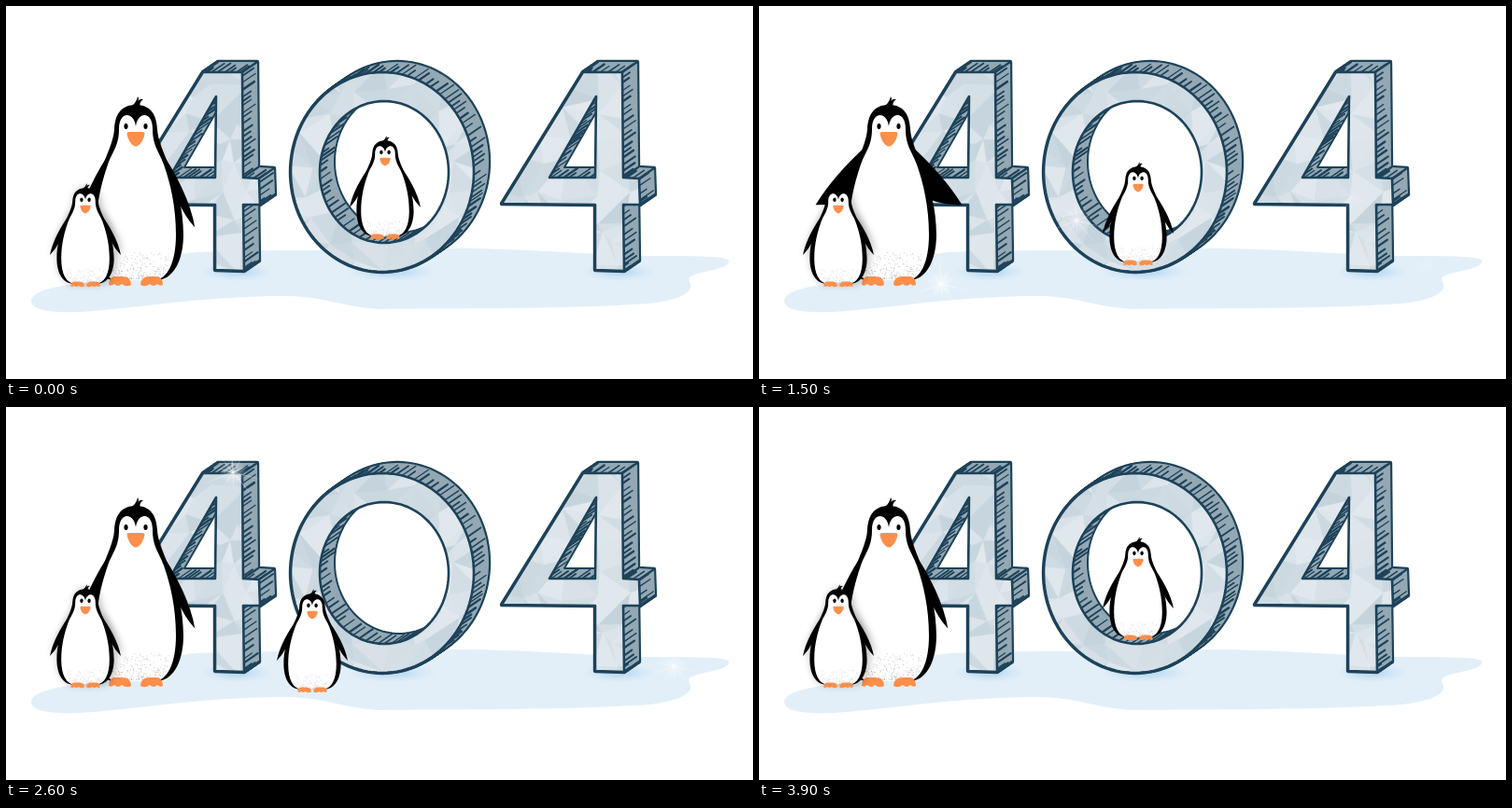
Animation, 800 px wide and 400 px high, one loop 4000 ms. Source, as an HTML page with a canvas:

```html
<!DOCTYPE html>
<html lang="en">
<head>
<meta charset="utf-8">
<title>404</title>
<style>
html, body { margin: 0; width: 100%; height: 100%; overflow: hidden; background: #fff; }
canvas { display: block; width: 800px; height: 400px; }
</style>
</head>
<body>
<canvas id="stage" width="800" height="400"></canvas>
<script>
const LOOP = 4000, STEP = 100;
const INK = '#1d4259', SIDE = '#93a8b3', ORANGE = '#fb8f4b';
const DX = 16, DY = -11;
const ctx = document.getElementById('stage').getContext('2d');

const lerp = (a, b, u) => a + (b - a) * u;
const clamp = u => Math.min(1, Math.max(0, u));
const smooth = u => u * u * (3 - 2 * u);
const bump = u => 4 * u * (1 - u);
function seeded(s) {
  return () => (s = (s * 16807) % 2147483647) / 2147483647;
}

const shape = pts => new Path2D('M' + pts.join('L') + 'Z');
const ring = (x, y, rx, ry) => Array.from({ length: 120 }, (_, i) => {
  const a = i * Math.PI / 60;
  return [x + rx * Math.cos(a), y + ry * Math.sin(a)];
});

// Low-poly ice over a box, inside the current clip
function facets(g, x, y, w, h, rnd) {
  const cell = 27, cols = Math.ceil(w / cell), rows = Math.ceil(h / cell);
  const grid = Array.from({ length: rows + 1 }, (_, r) => Array.from({ length: cols + 1 }, (_, c) =>
    [x + (c + rnd() * .8 - .4) * cell, y + (r + rnd() * .8 - .4) * cell]));
  const tri = (...pts) => {
    const v = rnd(), p = shape(pts);
    g.fillStyle = g.strokeStyle = `rgb(${lerp(196, 226, v)},${lerp(211, 233, v)},${lerp(220, 238, v)})`;
    g.fill(p);
    g.stroke(p);
  };
  g.lineWidth = .5;
  for (let r = 0; r < rows; r++) for (let c = 0; c < cols; c++) {
    const a = grid[r][c], b = grid[r][c + 1], d = grid[r + 1][c], e = grid[r + 1][c + 1];
    if (rnd() < .5) { tri(a, b, d); tri(b, d, e); }
    else { tri(a, b, e); tri(a, d, e); }
  }
}

// Pen strokes in the depth direction all along an outline
function hatch(g, pts, rnd) {
  const gap = 6.5;
  let rest = gap / 2;
  pts.forEach(([x, y], i) => {
    const [x2, y2] = pts[(i + 1) % pts.length], len = Math.hypot(x2 - x, y2 - y);
    for (; rest < len; rest += gap * (.65 + rnd() * .7)) {
      const u = rest / len, k = .4 + rnd() * .55;
      g.lineWidth = 1.2 + rnd() * 1.3;
      g.beginPath();
      g.moveTo(lerp(x, x2, u), lerp(y, y2, u));
      g.lineTo(lerp(x, x2, u) + DX * k, lerp(y, y2, u) + DY * k);
      g.stroke();
    }
    rest -= len;
  });
}

// A digit: swept side, icy front, hole with its inner side
function block(g, outer, inner, seed) {
  const rnd = seeded(seed), face = shape(outer), hole = shape(inner);
  const shifted = (path, k, draw) => {
    g.save();
    g.translate(DX * k, DY * k);
    draw(path);
    g.restore();
  };
  g.strokeStyle = INK;
  g.fillStyle = SIDE;
  g.lineWidth = 4.4;
  for (let k = 0; k <= 1; k += 1 / 16) shifted(face, k, p => g.stroke(p));
  for (let k = 0; k <= 1; k += 1 / 16) shifted(face, k, p => g.fill(p));
  hatch(g, outer, rnd);
  g.lineWidth = 2.2;
  if (outer.length < 20) for (const [x, y] of outer) {
    g.beginPath();
    g.moveTo(x, y);
    g.lineTo(x + DX, y + DY);
    g.stroke();
  }

  const xs = outer.map(p => p[0]), ys = outer.map(p => p[1]);
  const left = Math.min(...xs) - 8, top = Math.min(...ys) - 8;
  g.save();
  g.clip(face);
  g.fillStyle = '#d3dfe6';
  g.fillRect(0, 0, 800, 400);
  facets(g, left, top, Math.max(...xs) + 8 - left, Math.max(...ys) + 8 - top, rnd);
  g.restore();

  g.strokeStyle = INK;
  g.fillStyle = SIDE;
  g.fill(hole);
  g.save();
  g.clip(hole);
  hatch(g, inner, rnd);
  g.fillStyle = '#fff';
  g.lineWidth = 2;
  shifted(hole, 1, p => { g.fill(p); g.stroke(p); });
  g.restore();
  g.lineWidth = 2.6;
  g.stroke(face);
  g.stroke(hole);
}

function drawFour(g, x, seed) {
  const at = pts => pts.map(([px, py]) => [px + x, py]);
  block(g,
    at([[87, 71], [129, 71], [130, 184], [147, 185], [148, 213], [130, 213], [131, 284], [100, 283], [100, 213], [0, 212]]),
    at([[101, 97], [100, 184], [51, 184]]), seed);
}

function drawScene() {
  const cv = document.createElement('canvas');
  cv.width = 800;
  cv.height = 400;
  const g = cv.getContext('2d');
  g.fillStyle = '#fff';
  g.fillRect(0, 0, 800, 400);
  g.fillStyle = '#e2eff8';
  g.fill(new Path2D(`M27 316C28 305 55 300 88 296C140 291 160 267 205 264
    C300 260 400 264 480 260C560 260 640 268 700 268C735 268 772 268 774 273
    C775 281 755 283 740 287C728 291 731 293 733 299C735 309 715 318 675 320
    C590 325 480 324 400 325C360 323 345 312 300 311C220 311 160 321 95 327
    C55 330 27 328 27 316Z`));
  for (const x of [247, 413, 656]) {
    g.save();
    g.translate(x, 285);
    g.scale(x === 413 ? 50 : 40, 11);
    const s = g.createRadialGradient(0, 0, .3, 0, 0, 1);
    s.addColorStop(0, '#c0ddf3');
    s.addColorStop(1, 'rgba(210,231,246,0)');
    g.fillStyle = s;
    g.fillRect(-1, -1, 2, 2);
    g.restore();
  }
  g.lineJoin = g.lineCap = 'round';
  drawFour(g, 124, 911);
  block(g, ring(403, 178, 98, 107), ring(405, 178, 69, 76), 4321);
  drawFour(g, 531, 2027);
  return cv;
}

// Right halves, mirrored for the left; feet rest at y = 0
const BODY = new Path2D('M-.5-194H0C14-194 22-186 23-168C24-145 51-110 51-55C51-30 42-8 24-6H-.5Z');
const BELLY = new Path2D('M-.5-171H0C2-187 18-188 18-168C18-150 25-144 30-130C37-110 43-85 43-55C43-25 34-7 20-6H-.5Z');
const TUFT = new Path2D('M-7-191Q1-196 2-203Q4-200 2-198Q5-201 8-200Q3-197 5-191Z');
const FOOT = new Path2D('M-12 3Q-12-6-2-6L6-6Q12-5 12 3Q9 5 6 2Q2 6-2 2Q-7 6-12 3Z');
const BEAK = new Path2D('M-9.5 2Q-9.5 0-6.5 0H6.5Q9.5 0 9.5 2Q8 11 2 15Q0 16-2 15Q-8 11-9.5 2Z');
const BIG = { sx: 1, sy: 1, eye: 10.5, er: 2.1, beak: -165, foot: 17 };
const SMALL = { sx: .6, sy: .545, eye: 6.8, er: 2.8, beak: -160, foot: 14 };

// The tip swings around the elbow; the outer edge flattens as it rises
function wingPath(open) {
  const a = .71 + open, tx = 32 + 48 * Math.sin(a), ty = -99 + 48 * Math.cos(a);
  const w = new Path2D();
  w.moveTo(22, -152);
  w.quadraticCurveTo((22 + tx) / 2 + 14 - open * 9, (ty - 152) / 2 + 6 - open * 9, tx, ty);
  w.quadraticCurveTo((45 + tx) / 2 - 2, (ty - 92) / 2 + 3, 45, -92);
  w.lineTo(30, -115);
  w.closePath();
  return w;
}

function penguin(k, x, y, open, kick = 0, shadow = false) {
  const wing = wingPath(open);
  const sides = draw => {
    for (const m of [1, -1]) {
      ctx.save();
      ctx.scale(m, 1);
      draw();
      ctx.restore();
    }
  };
  ctx.save();
  ctx.translate(x, y);
  ctx.scale(k.sx, k.sy);
  ctx.fillStyle = '#000';
  if (shadow) {
    ctx.shadowColor = 'rgba(0,0,0,.3)';
    ctx.shadowBlur = 8;
    ctx.shadowOffsetX = 2;
  }
  sides(() => { ctx.fill(BODY); ctx.fill(wing); });
  ctx.shadowColor = 'transparent';
  ctx.fill(TUFT);
  ctx.fillStyle = '#fff';
  sides(() => ctx.fill(BELLY));

  const rnd = seeded(53);
  ctx.fillStyle = 'rgba(40,40,40,.32)';
  for (let i = 0; i < 220; i++) {
    const v = rnd() ** 1.7, half = 25 + 15 * Math.sqrt(v);
    ctx.fillRect((rnd() * 2 - 1) * half, -8 - v * 28, .8, .8);
  }

  ctx.fillStyle = '#000';
  sides(() => ctx.fill(shape(ring(k.eye, -171, k.er, k.er * 1.45))));
  ctx.fillStyle = ORANGE;
  ctx.save();
  ctx.translate(0, k.beak);
  ctx.fill(BEAK);
  ctx.restore();
  sides(() => {
    ctx.translate(k.foot + kick * 31, -4 - kick * 12);
    ctx.rotate(-kick * .5);
    ctx.fill(FOOT);
  });
  ctx.restore();
}

// Sparkles light up one after another, ever more slowly
const SPARKS = [[523, 281], [634, 206], [340, 230], [195, 298], [715, 278], [243, 70]];
function spark(t, [x, y], i) {
  const peak = 400 + 330 * i + 30 * i * i, r = 30;
  const a = clamp(t < peak ? 1 - (peak - t) / Math.min(peak, 800) : 1 - (t - peak) / 900);
  if (!a) return;
  ctx.save();
  ctx.translate(x, y);
  ctx.globalAlpha = a;
  const glow = ctx.createRadialGradient(0, 0, 0, 0, 0, r * .5);
  glow.addColorStop(0, '#fff');
  glow.addColorStop(.2, 'rgba(255,255,255,.5)');
  glow.addColorStop(1, 'rgba(255,255,255,0)');
  ctx.fillStyle = glow;
  ctx.fillRect(-r, -r, 2 * r, 2 * r);
  ctx.fillStyle = 'rgba(255,255,255,.55)';
  ctx.rotate(.25);
  for (let n = 0; n < 10; n++) {
    ctx.rotate(Math.PI / 5);
    ctx.fill(shape([[0, -.8], [r * (n % 3 ? .65 : 1.2), 0], [0, .8]]));
  }
  ctx.restore();
}

// Jumps up, lands on the rim, hops to the left, later leaps back
function hopper(t) {
  const ease = (a, b) => smooth(clamp((t - a) / (b - a)));
  const up = ease(200, 1000), down = ease(1000, 1500), out = ease(1700, 2200);
  const crouch = bump(ease(3100, 3400)), back = ease(3250, 3800);
  const kick = (up * (1 - down)) ** .75;
  return [
    406 - 78 * (out - back),
    250 - 29 * up + 57 * down + 28 * out - 56 * back - 22 * bump(out) - 40 * bump(back) + 12 * crouch,
    kick + .7 * (bump(out) + bump(back)),
    kick
  ];
}

const scene = drawScene();
function render(now) {
  const t = Math.floor((now % LOOP) / STEP) * STEP;
  ctx.drawImage(scene, 0, 0);
  SPARKS.forEach((p, i) => spark(t, p, i));
  penguin(BIG, 139, 300, .72 * Math.sin(Math.PI * clamp(t / 2300)) ** 1.5 || 0);
  penguin(SMALL, 85, 301, 0, 0, true);
  penguin(SMALL, ...hopper(t));
}

const begin = performance.now();
function tick() {
  render(performance.now() - begin);
  requestAnimationFrame(tick);
}
tick();
</script>
</body>
</html>
```
